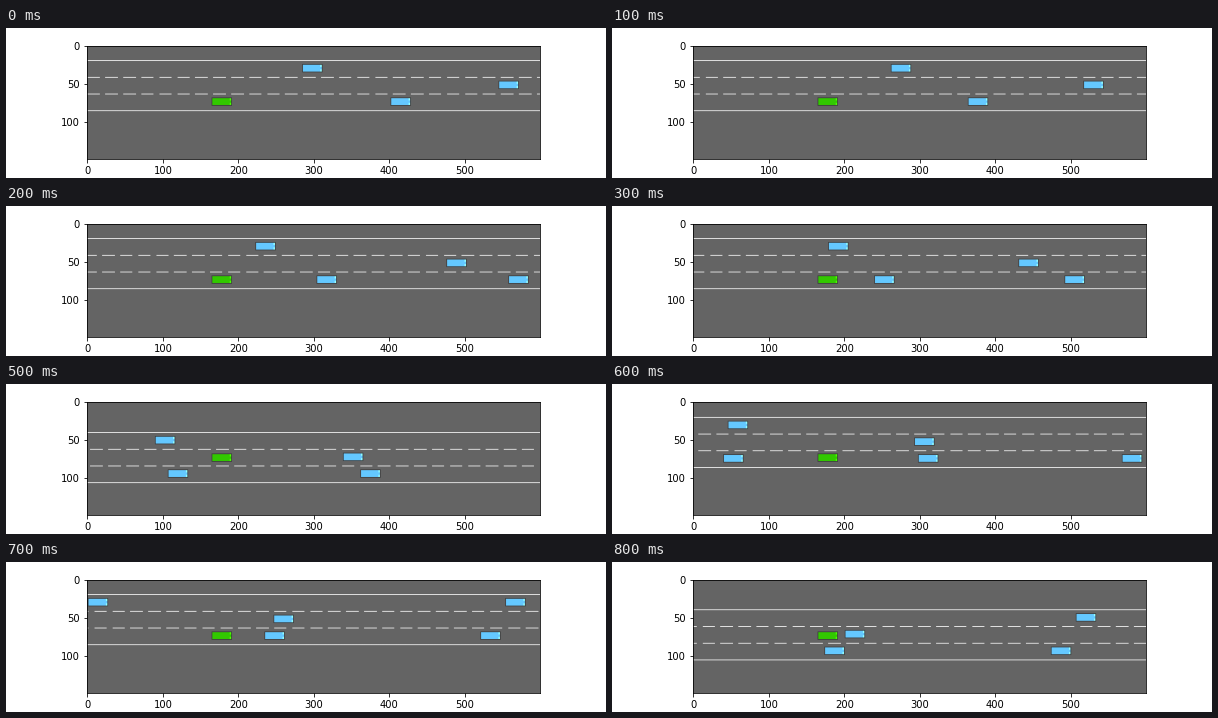
Write a matplotlib script that moves like this. It is 600 by 150 pixels and loops after 900 ms.

```python
import numpy as np
import matplotlib.pyplot as plt
from matplotlib.animation import FuncAnimation

W, H, DPI = 600, 150, 72
FRAMES, STEP = 9, 100

ROAD = (100, 100, 100)
WHITE = (255, 255, 255)
EDGE = (60, 60, 60)
BLUE = (100, 200, 255)
GREEN = (50, 200, 0)

LANE, TOP = 22, 20             # lane width, upper edge of the road
CAR_W, CAR_H = 27, 11
DASH, PERIOD = 16.5, 23.815    # stripe length and spacing
CRUISE = 164                   # distance per step at full speed
EGO = (165, 69)

# time and direction of each lane change of the green car
TURNS = [(3, 1), (5, -1), (7, 1)]

# lane, start, closing speed, head start while the green car speeds up, braking
TRAFFIC = [
    (0, 285, 44.7, 29, 0),
    (2, 402, 66.6, 38, 0),
    (1, 545, 46.0, 24, 0),
    (2, 694, 68.9, 0, 0.48),
    (2, 850, 47.0, 0, 0),
    (0, 881.4, 46.8, 0, 0),
]


def settle(t, rest):
    """Ease from 0 to 1; `rest` is the share left after one step."""
    return 1 - rest ** max(t, 0)


def road_top(t):
    shift = sum(way * settle(t - start, 0.06) for start, way in TURNS)
    return int(TOP + LANE * shift)


def travelled(t):
    return CRUISE * t - 38 * settle(t, 0.02)


def car_x(t, start, speed, lead, brake):
    return round(start - speed * t + lead * settle(t, 0.25) + brake * t * t)


def fill(img, x, y, w, h, color):
    img[y:y + h, max(x, 0):max(x + w, 0)] = color


def draw_car(img, x, y, color):
    light = [min(int(c / 0.68), 255) for c in color]
    fill(img, x, y, CAR_W, CAR_H, EDGE)
    fill(img, x + 1, y + 1, CAR_W - 2, CAR_H - 2, color)
    for dy in (1, 7):
        fill(img, x + CAR_W - 3, y + dy, 2, 3, light)


def draw_road(img, top, t):
    dashes = (np.arange(W) + travelled(t)) % PERIOD < DASH
    for k in range(4):
        cols = dashes if k in (1, 2) else slice(None)
        img[top + k * LANE, cols] = WHITE


def render(t):
    img = np.full((H, W, 3), ROAD, dtype=np.uint8)
    top = road_top(t)
    draw_road(img, top, t)
    for lane, *motion in TRAFFIC:
        draw_car(img, car_x(t, *motion), top + lane * LANE + 5, BLUE)
    draw_car(img, *EGO, GREEN)
    return img


fig, ax = plt.subplots(figsize=(W / DPI, H / DPI), dpi=DPI)
fig.subplots_adjust(left=0.125, right=0.9, bottom=0.125, top=0.88)
view = ax.imshow(render(0))


def update(i):
    view.set_data(render(i))
    return [view]


anim = FuncAnimation(fig, update, frames=FRAMES, interval=STEP, repeat=True)
plt.show()
```
